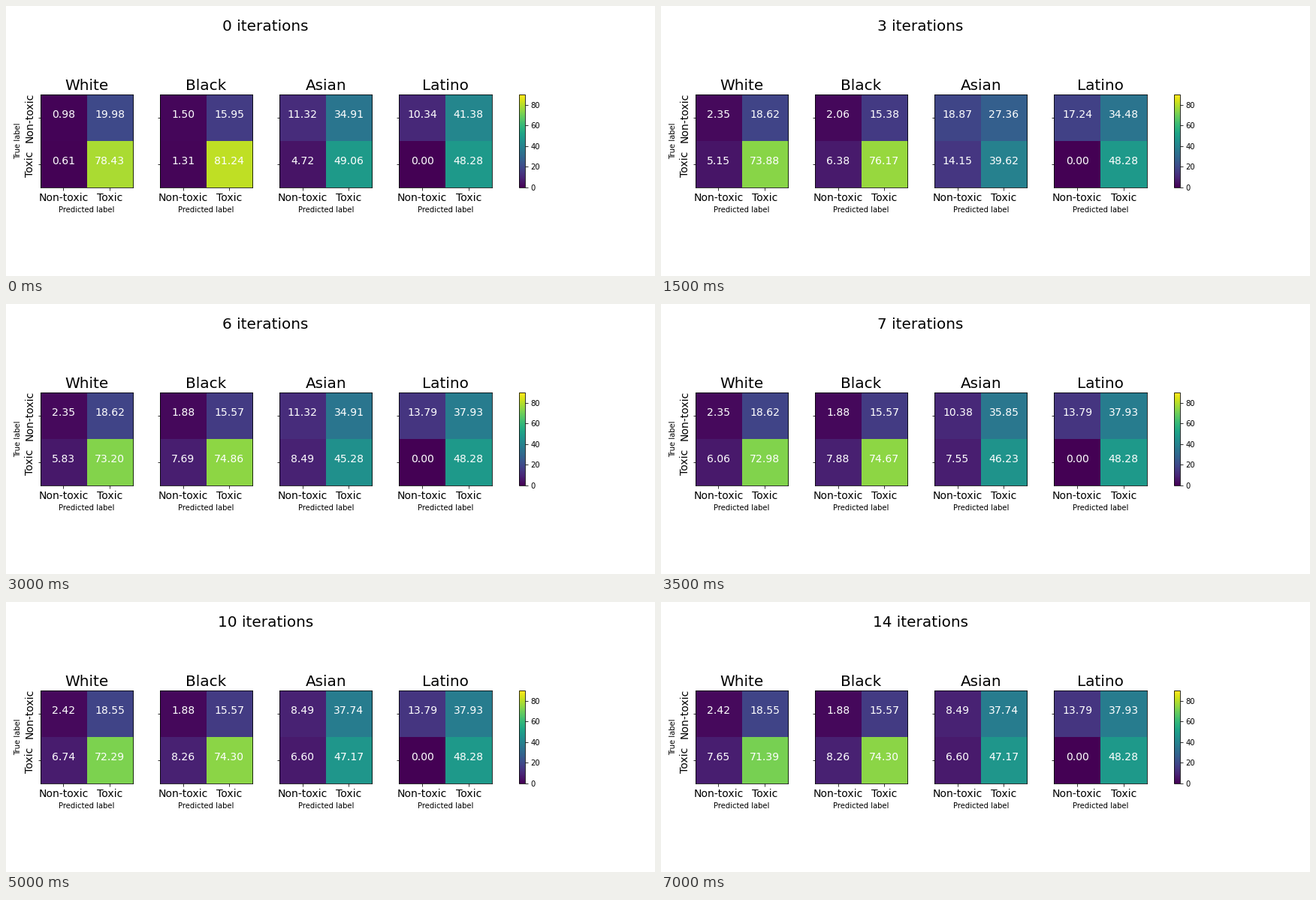
Write a matplotlib script that moves like this. It is 864 by 360 pixels and loops after 7.5 s.

```python
import numpy as np
import matplotlib.pyplot as plt
from matplotlib.animation import FuncAnimation

W, H, DPI = 864, 360, 72
FRAMES, STEP_MS = 15, 500
LEFT, PITCH, SIDE = 45.65, 159.23, 123.18
CLASSES = ["Non-toxic", "Toxic"]


def drift(n):
    """Steady change until the last iteration."""
    return n / (FRAMES - 2)


def settle(n):
    """S-shaped change, half done after four iterations."""
    return n**4 / (n**4 + 4**4)


# group: easing, then for each true label
# (total, non-toxic predictions untrained, after one iteration, at the end)
GROUPS = {
    "White": (drift, (277, 13, 31, 32), (1044, 8, 62, 101)),
    "Black": (settle, (93, 8, 11, 10), (440, 7, 33, 44)),
    "Asian": (settle, (49, 12, 21, 9), (57, 5, 15, 7)),
    "Latino": (settle, (15, 3, 5, 4), (14, 0, 0, 0)),
}


def matrix(group, i):
    """Confusion matrix of a group at iteration i, in percent."""
    ease, *rows = GROUPS[group]
    counts = []
    for total, start, first, last in rows:
        hits = start if i == 0 else round(first + (last - first) * ease(i - 1))
        counts.append([hits, total - hits])
    return 100 * np.array(counts) / np.sum(counts)


def add_axes(x, width):
    y = (H - SIDE) / 2
    return fig.add_axes([x / W, y / H, width / W, SIDE / H])


def add_panel(k, group):
    ax = add_axes(LEFT + k * PITCH, SIDE)
    image = ax.imshow(matrix(group, 0), cmap="viridis", vmin=0, vmax=90,
                      aspect="auto", interpolation="nearest")
    ax.set_title(group, fontsize=20)
    ax.set_xticks([0, 1], CLASSES, fontsize=14)
    ax.set_xlabel("Predicted label")
    if k == 0:
        ax.set_yticks([0, 1], CLASSES, fontsize=14, rotation=90, va="center")
        ax.set_ylabel("True label")
    else:
        ax.set_yticks([0, 1], ["", ""])
    cells = [ax.text(col, row, "", color="white", fontsize=14, ha="center")
             for row in range(2) for col in range(2)]
    return group, image, cells


plt.rcParams.update({"font.family": "DejaVu Sans", "font.size": 10})
fig = plt.figure(figsize=(W / DPI, H / DPI), dpi=DPI, facecolor="white")
panels = [add_panel(k, group) for k, group in enumerate(GROUPS)]
fig.colorbar(panels[0][1], cax=add_axes(683, 8.2), ticks=range(0, 81, 20))
heading = fig.text(0.4, 0.95, "", fontsize=20, ha="center", va="top")


def update(i):
    heading.set_text(f"{i} iterations")
    for group, image, cells in panels:
        values = matrix(group, i)
        image.set_data(values)
        for cell, value in zip(cells, values.flat):
            cell.set_text(f"{value:.2f}")


anim = FuncAnimation(fig, update, frames=FRAMES, init_func=lambda: update(0),
                     interval=STEP_MS, repeat=True, repeat_delay=0)
plt.show()
```
